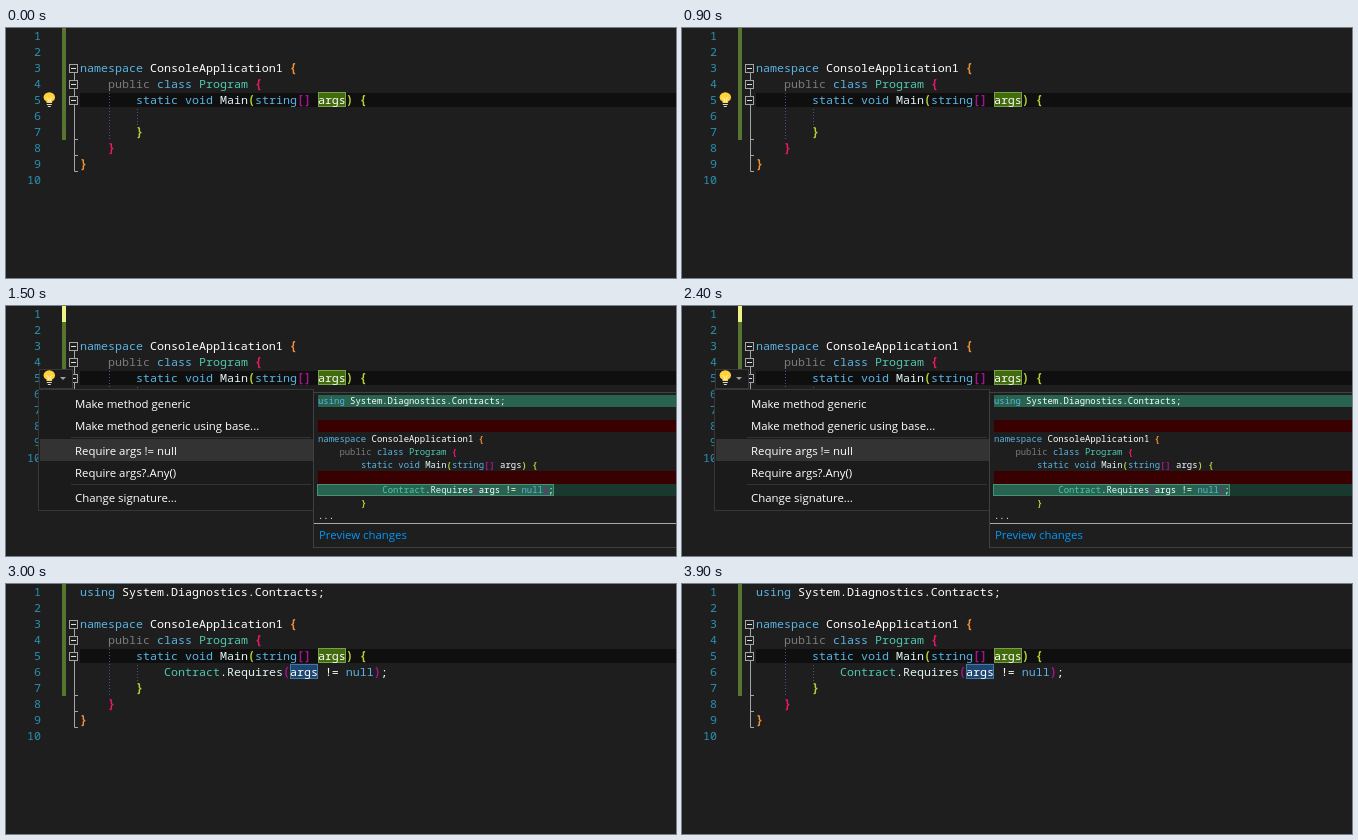
Recreate the animation shown at these times as an HTML page. Size 670 by 250 pixels, loop 4500 ms.

```html
<!DOCTYPE html>
<html lang="en">
<head>
<meta charset="utf-8">
<title>Require argument refactoring</title>
<style>
  html, body { margin: 0; width: 100%; height: 100%; overflow: hidden; background: #1e1e1e; }
  svg { display: block; width: 670px; height: 250px; }
  text { white-space: pre; fill: #fff; }
  .code { font: 500 11.667px "Noto Sans Mono", monospace; }
  .small { font: 500 8.93px "Noto Sans Mono", monospace; }
  .ui { font: 11.4px "Open Sans", sans-serif; }
  .nums text { fill: #2b91af; text-anchor: end; }
  .k { fill: #5bb4e5; }
  .t { fill: #4ec9b0; }
  .dim { fill: #7b7b7b; }
  .m { fill: #e0f4f5; }
  .b1, .b2, .b3, .b4 { font-weight: 700; }
  .b1 { fill: #f0913a; }
  .b2 { fill: #f0176a; }
  .b3 { fill: #b4d036; }
  .b4 { fill: #a3138f; }
  .step { animation: show 4.5s step-end infinite; }
  .menu { animation-delay: -3s; }
  .done { animation-delay: -1.5s; }
  @keyframes show {
    0% { visibility: visible; }
    33.3333%, 100% { visibility: hidden; }
  }
</style>
</head>
<body>
<svg viewBox="0 0 670 250">
  <defs>
    <g id="fold">
      <rect x="63.5" y="-4.5" width="8" height="8" fill="#1e1e1e" stroke="#a5a5a5"/>
      <path d="M65 -.5h5" stroke="#e0e0e0"/>
    </g>
    <g id="bulb">
      <path d="M40.5 75V73.6Q37.5 72 37.5 69.5a5.8 5.3 0 0 1 11.6 0Q49.1 72 46.1 73.6V75z" fill="#ffd23c"/>
      <path d="M42.3 74v-3l-1.6-1.8M44.3 74v-3l1.6-1.8" fill="none" stroke="#fff6d0"/>
      <path d="M40.8 76.5h5M41.8 78.5h3" stroke="#d8d8d8"/>
    </g>
  </defs>

  <rect width="670" height="250" fill="#1e1e1e"/>
  <rect x="56" width="4" height="112" fill="#577430"/>
  <rect x="74" y="65" width="596" height="14" fill="#0f0f0f"/>
  <path d="M68.5 45V143.5H72M68.5 111.5H72M68.5 127.5H72" fill="none" stroke="#a5a5a5"/>
  <use href="#fold" y="41"/>
  <use href="#fold" y="57"/>
  <use href="#fold" y="73"/>
  <path d="M103.5 65V112M131.5 81V97" stroke="#4a558c" stroke-dasharray="1 2"/>
  <rect x="312.5" y="64.5" width="27" height="14" fill="#416b0c" stroke="#78a04a"/>

  <g class="code nums" id="nums"></g>
  <g class="code">
    <text x="74" y="44"><tspan class="k">namespace</tspan> ConsoleApplication1 <tspan class="b1">{</tspan></text>
    <text x="102" y="60"><tspan class="dim">public</tspan> <tspan class="k">class</tspan> <tspan class="t">Program</tspan> <tspan class="b2">{</tspan></text>
    <text x="130" y="76"><tspan class="k">static void</tspan> <tspan class="m">Main</tspan><tspan class="b3">(</tspan><tspan class="k">string</tspan><tspan class="b4">[]</tspan> args<tspan class="b3">) {</tspan></text>
    <text x="130" y="108" class="b3">}</text>
    <text x="102" y="124" class="b2">}</text>
    <text x="74" y="140" class="b1">}</text>
  </g>

  <g class="step"><use href="#bulb"/></g>

  <g class="step menu">
    <rect x="56" width="4" height="16" fill="#eff284"/>
    <rect x="33.5" y="63.5" width="33" height="19" fill="#1b1b1c" stroke="#37373b"/>
    <use href="#bulb"/>
    <path d="M54 71h6l-3 3z" fill="#a0a0a0"/>

    <rect x="32.5" y="83.5" width="275" height="121" fill="#1b1b1c" stroke="#37373b"/>
    <rect x="34" y="133" width="273" height="22" fill="#333334"/>
    <path d="M65 131.5H305M65 178.5H305" stroke="#333337"/>
    <g class="ui">
      <text x="69" y="102">Make method generic</text>
      <text x="69" y="124">Make method generic using base...</text>
      <text x="69" y="149">Require args != null</text>
      <text x="69" y="171">Require args?.Any()</text>
      <text x="69" y="196">Change signature...</text>
    </g>

    <rect x="307.5" y="86.5" width="370" height="155" fill="#1e1e1e" stroke="#3f3f46"/>
    <path d="M308 217.5H670" stroke="#a8a8a8"/>
    <rect x="312" y="89" width="358" height="12" fill="#27634f"/>
    <path d="M312 114H670V126H312zM312 165H670V178H312z" fill="#380000"/>
    <rect x="312" y="178" width="358" height="12" fill="#19382e"/>
    <rect x="311.5" y="178.5" width="236" height="11" fill="#27634f" stroke="#469078"/>
    <g class="small">
      <text x="312" y="98"><tspan class="k">using</tspan> System.Diagnostics.Contracts;</text>
      <text x="312" y="136"><tspan class="k">namespace</tspan> ConsoleApplication1 <tspan class="b1">{</tspan></text>
      <text x="333.4" y="149"><tspan class="dim">public</tspan> <tspan class="k">class</tspan> <tspan class="t">Program</tspan> <tspan class="b2">{</tspan></text>
      <text x="354.9" y="162"><tspan class="k">static void</tspan> <tspan class="m">Main</tspan><tspan class="b3">(</tspan><tspan class="k">string</tspan><tspan class="b4">[]</tspan> args<tspan class="b3">) {</tspan></text>
      <text x="376.3" y="187"><tspan class="t">Contract</tspan>.<tspan class="m">Requires</tspan><tspan class="b4">(</tspan>args != <tspan class="k">null</tspan><tspan class="b4">)</tspan>;</text>
      <text x="354.9" y="200" class="b3">}</text>
      <text x="312" y="213">...</text>
    </g>
    <g class="ui"><text x="313" y="233" style="fill:#0097fb">Preview changes</text></g>
  </g>

  <g class="step done code">
    <rect x="284.5" y="80.5" width="27" height="14" fill="#1d4670" stroke="#4778a8"/>
    <text x="74" y="12"><tspan class="k">using</tspan> System.Diagnostics.Contracts;</text>
    <text x="158" y="92"><tspan class="t">Contract</tspan>.<tspan class="m">Requires</tspan><tspan class="b4">(</tspan>args != <tspan class="k">null</tspan><tspan class="b4">)</tspan>;</text>
  </g>
</svg>
<script>
  const nums = document.getElementById("nums");
  for (let n = 1; n <= 10; n++) {
    const label = document.createElementNS("http://www.w3.org/2000/svg", "text");
    label.setAttribute("x", 35);
    label.setAttribute("y", 16 * n - 4);
    label.textContent = n;
    nums.append(label);
  }
</script>
</body>
</html>
```
